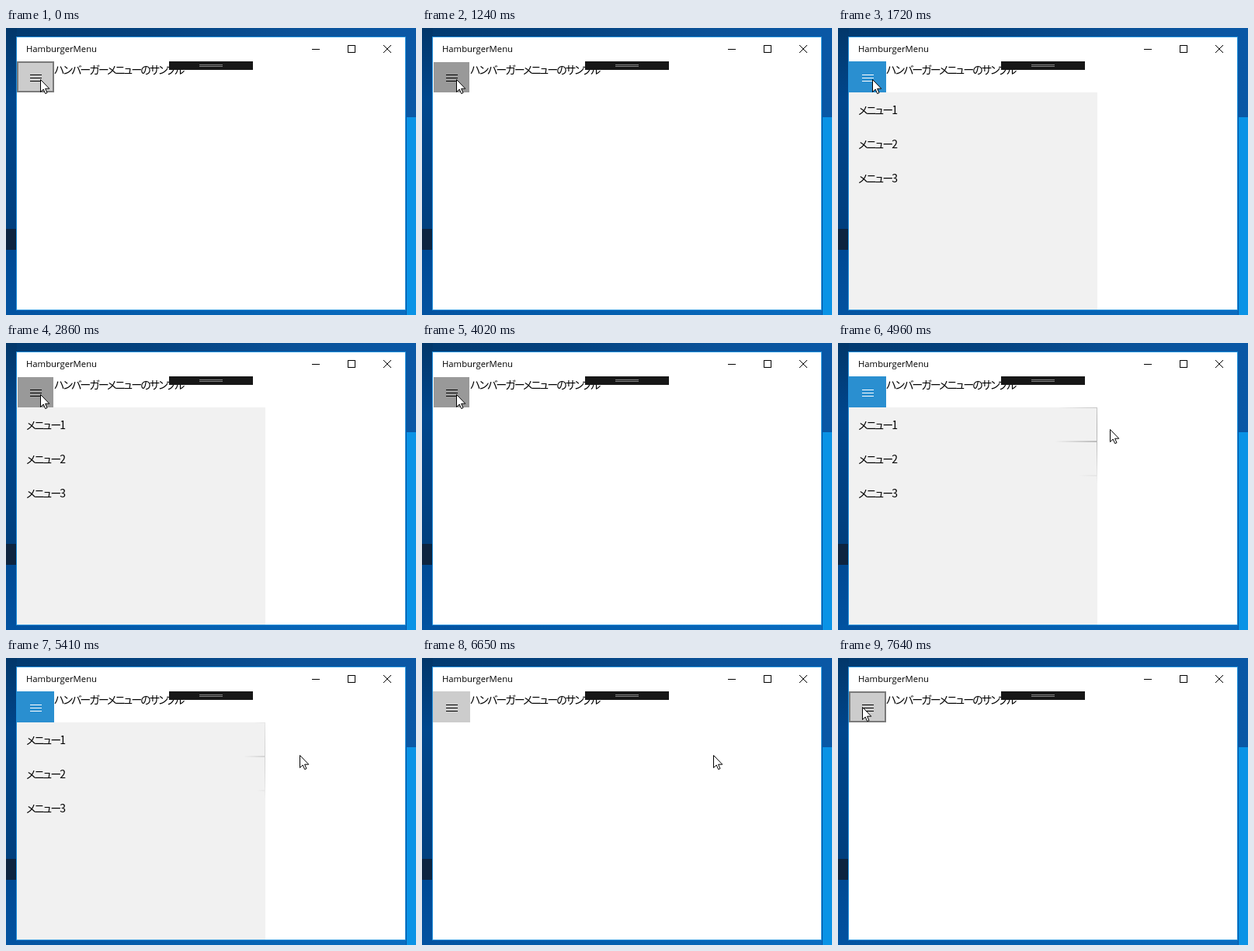
An HTML page for the animation above (7960 ms loop, 528 by 370 pixels).

```html
<!DOCTYPE html>
<html lang="ja">
<head>
<meta charset="utf-8">
<title>HamburgerMenu</title>
<style>
html, body { margin: 0; width: 100%; height: 100%; overflow: hidden; }
.stage {
  position: relative; width: 528px; height: 370px; overflow: hidden;
  background: linear-gradient(90deg, #023a70, #04427f 35%, #0a5198 70%, #0a58a6);
  --x: 44px; --y: 66px; --a: 0;
  animation: point 7960ms step-end infinite;
}
.stage div, .stage svg { position: absolute; }
.edge { left: 0; top: 0; width: 14px; height: 370px;
  background: linear-gradient(#02376a, #00468c 25%, #003f7e 70%, #0d2440 70%, #0d2440 77.3%, #004a94 77.3%, #0252a0); }
.foot { left: 0; top: 363px; width: 515px; height: 7px;
  background: linear-gradient(90deg, #0252a0, #0460b0 50%, #0a6cc0); }
.glow { left: 516px; top: 115px; width: 12px; height: 255px; background: #0a93e6; }
.win { left: 13px; top: 11px; width: 500px; height: 351px; background: #fff; border: 1px solid #1e90dc; }
.title { left: 26px; top: 18px; font: 11.3px/18px "Open Sans", "Noto Sans", sans-serif; color: #000; white-space: nowrap; }
.jp {
  font: 14px/20px "Noto Sans CJK JP", "Noto Sans CJK", sans-serif;
  font-feature-settings: "palt"; letter-spacing: -1.9px; color: #000; white-space: nowrap;
}
.head { left: 62px; top: 43px; }
.bar { left: 210px; top: 43px; width: 108px; height: 11px; background: #171717; }
.bar::before { content: ""; position: absolute; left: 39px; top: 4px; width: 30px; height: 1px;
  border: solid #858585; border-width: 1px 0; }

.btn { left: 14px; top: 43px; width: 48px; height: 40px; box-sizing: border-box;
  animation: press 7960ms step-end infinite; }
.icon { left: 31px; top: 60px; width: 15px; height: 9px; color: #000;
  background: linear-gradient(currentColor 1px, transparent 1px) 0 0 / 100% 4px;
  animation: ink 7960ms step-end infinite; }

.pane { left: 14px; top: 83px; width: 320px; height: 280px; background: #f1f1f1;
  animation: slide 7960ms linear infinite; }
.list { left: 0; top: 0; width: 320px; height: 132px;
  background: radial-gradient(circle 72px at calc(var(--x) - 14px) calc(var(--y) - 83px),
    rgb(0 0 0 / var(--a)), transparent); }
.item { left: 1px; width: 318px; height: 42px; background: #f1f1f1; }
.item span { position: absolute; left: 11px; top: 11px; animation: enter 7960ms linear infinite; }
.item:nth-child(1) { top: 1px; }
.item:nth-child(2) { top: 45px; }
.item:nth-child(3) { top: 89px; }
.cursor { left: 0; top: 0; overflow: visible; transform: translate(var(--x), var(--y)); }

@keyframes press {
  0%, 36.06%, 92.96%, 100% { background: #ccc; border: 2px solid #7a7a7a; transform: none; }
  15.58%, 34.92%, 50.5% { background: #999; border: 0 solid #999; transform: scale(.975); }
  16.58%, 52.39% { background: #2a8fd0; border: 0 solid #2a8fd0; transform: none; }
  75.75% { background: #ccc; border: 0 solid #ccc; transform: none; }
}
@keyframes ink {
  0%, 34.92%, 75.75%, 100% { color: #000; }
  16.58%, 52.39% { color: #fff; }
}
@keyframes slide {
  0%, 37.06%, 75.76%, 100% { clip-path: inset(0 100% 0 0); }
  16.58%, 52.39% { clip-path: inset(0 100% 0 0); animation-timing-function: cubic-bezier(0, .35, .15, 1); }
  20.98%, 36.06%, 56.79%, 75.75% { clip-path: inset(0); }
}
@keyframes enter {
  0%, 37.07%, 100% { opacity: 0; transform: translateX(40px); }
  16.58%, 52.39% { opacity: 0; transform: translateX(40px); animation-timing-function: cubic-bezier(.2, .7, .3, 1); }
  21.6%, 37.06%, 57.41%, 75.75% { opacity: 1; transform: none; }
}
/* pointer position and strength of the border light */
@keyframes point {
  0% { --x: 44px; --y: 66px; --a: 0; }
  59.17% { --x: 78px; --y: 66px; --a: .32; }
  60.43% { --x: 214px; --y: 77px; --a: .32; }
  61.43% { --x: 296px; --y: 95px; --a: .32; }
  62.31% { --x: 350px; --y: 111px; --a: .32; }
  63.19% { --x: 366px; --y: 122px; --a: .32; }
  64.07% { --x: 373px; --y: 129px; --a: .32; }
  65.08% { --x: 376px; --y: 133px; --a: .32; }
  66.08% { --x: 378px; --y: 134px; --a: .32; }
  66.96% { --x: 379px; --y: 130px; --a: .32; }
  67.96% { --x: 378px; --y: 125px; --a: .32; }
  75.75% { --x: 378px; --y: 125px; --a: 0; }
  83.54% { --x: 375px; --y: 125px; --a: 0; }
  84.48% { --x: 362px; --y: 122px; --a: 0; }
  85.43% { --x: 338px; --y: 115px; --a: 0; }
  86.37% { --x: 300px; --y: 106px; --a: 0; }
  87.31% { --x: 252px; --y: 95px; --a: 0; }
  88.25% { --x: 200px; --y: 84px; --a: 0; }
  89.2% { --x: 152px; --y: 75px; --a: 0; }
  90.14% { --x: 112px; --y: 69px; --a: 0; }
  91.08% { --x: 84px; --y: 65px; --a: 0; }
  92.02% { --x: 66px; --y: 63px; --a: 0; }
  92.96% { --x: 54px; --y: 63px; --a: 0; }
  93.97% { --x: 46px; --y: 63px; --a: 0; }
  94.97% { --x: 37px; --y: 63px; --a: 0; }
  95.98%, 100% { --x: 31px; --y: 63px; --a: 0; }
}
</style>
</head>
<body>
<div class="stage">
  <div class="edge"></div>
  <div class="foot"></div>
  <div class="glow"></div>
  <div class="win"></div>
  <div class="title">HamburgerMenu</div>
  <svg width="528" height="44" fill="none" stroke="#000" style="left:0;top:0">
    <path d="M394 27.5h10M440.5 22.5h9v9h-9z" shape-rendering="crispEdges"/>
    <path d="M486 22l10 10M496 22l-10 10"/>
  </svg>
  <div class="pane">
    <div class="list">
      <div class="item jp"><span>メニュー1</span></div>
      <div class="item jp"><span>メニュー2</span></div>
      <div class="item jp"><span>メニュー3</span></div>
    </div>
  </div>
  <div class="btn"></div>
  <div class="icon"></div>
  <div class="head jp">ハンバーガーメニューのサンプル</div>
  <div class="bar"></div>
  <svg class="cursor" width="13" height="20">
    <path d="M.5 .5V16.5L4.2 13L6.7 18.6L9 17.6L6.6 12.2H11.8Z" fill="#fff" stroke="#000"/>
  </svg>
</div>
</body>
</html>
```
